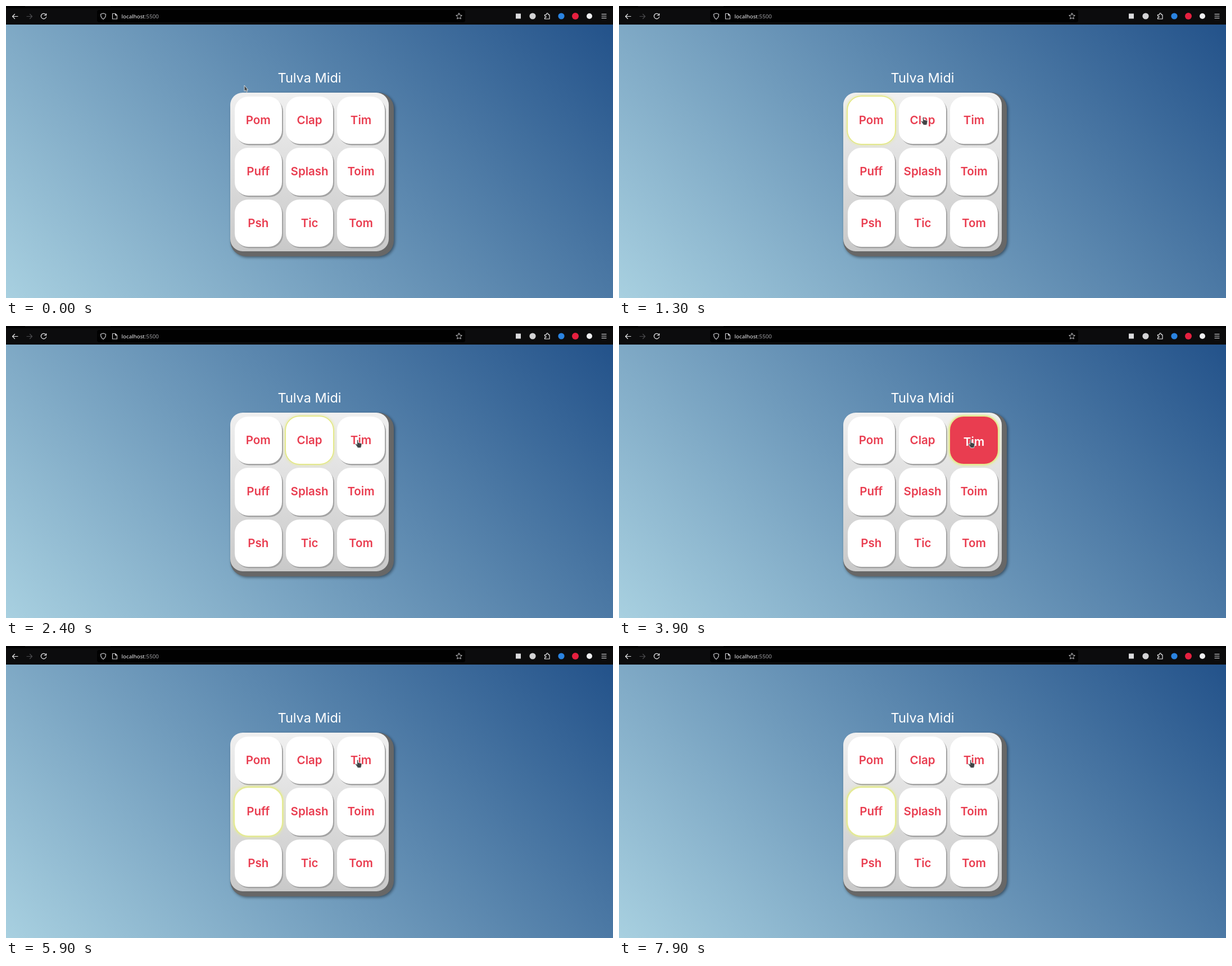
Recreate the animation shown at these times as an HTML page. Size 1080 px wide and 519 px high, loop 8000 ms.

```html
<!DOCTYPE html>
<html lang="pt">
<head>
<meta charset="utf-8">
<title>Tulva Midi</title>
<style>
  html, body { margin: 0; width: 100%; height: 100%; overflow: hidden; background: #0c0c0d; }
  #stage { position: relative; width: 1080px; height: 519px; overflow: hidden; }
  #stage > * { position: absolute; }
  #page { left: 0; top: 33px; width: 1080px; height: 486px; background: linear-gradient(45deg, #a8d0e0, #23528a); }
  #bar { left: 0; top: 0; }
  h1 { left: 0; top: 112px; width: 1080px; margin: 0; text-align: center; color: #fff;
       font: 400 23.5px/32px Inter, sans-serif; }
  #base { left: 399px; top: 154px; width: 291px; height: 291px; border-radius: 28px;
          background: #676767; box-shadow: 2px 2px 5px rgba(0, 0, 0, .45); }
  #board { left: 399px; top: 154px; width: 282px; height: 281.5px; border-radius: 22px;
           background: linear-gradient(#f0f0f0, #c9c9c9); }
  .key { width: 84.5px; height: 84.5px; border-radius: 24px; background: #fff; color: #e93d50;
         box-shadow: 2px 2.5px 0 #a3a3a3; text-align: center; font: 600 20.5px/84.5px Inter, sans-serif; }
  .key.focus { box-shadow: 0 0 0 1.5px #e3e87c, 0 0 5px 2px #e6eaa0; }
  .key.strong { box-shadow: 0 0 0 2.5px #e4ea94, 0 0 5px 3px #e4e9a4; }
  .key.down { background: #e93d50; color: #fff; line-height: 90.5px; }
  #pointer { left: 0; top: 0; overflow: visible; }
</style>
</head>
<body>
<div id="stage">
  <div id="page"></div>
  <svg id="bar" width="1080" height="33" fill="none" stroke="#e8e8ea" stroke-width="1.2" stroke-linecap="round" stroke-linejoin="round">
    <g stroke="none">
      <rect width="1080" height="33" fill="#0c0c0d"/>
      <rect width="1080" height="4" fill="#020202"/>
      <path d="M34 0h152v1H34z" fill="#1c1c1e"/>
      <rect x="162" y="7" width="655" height="22" rx="4" fill="#010101"/>
      <text x="205.5" y="22" font-family="Noto Sans, sans-serif" font-size="9.8" fill="#f4f4f6">localhost<tspan fill="#a2a2a6">:5500</tspan></text>
      <rect x="907" y="13.5" width="9" height="9" fill="#dcdcde"/>
      <circle cx="937" cy="18" r="5.6" fill="#d2d2d4"/>
      <circle cx="988" cy="18" r="5.6" fill="#2a83e0"/>
      <circle cx="1013" cy="18" r="6" fill="#e5203f"/>
      <circle cx="1038" cy="18" r="5" fill="#f0f0f2"/>
    </g>
    <path d="M21 18.500H11.500M15.500 14.500l-4 4 4 4"/>
    <path d="M37 18.500h9.500M42.500 14.500l4 4-4 4" stroke="#4b4b4e"/>
    <path d="M71 15.500A4.700 4.700 0 1 0 71.700 19M71.700 13.500v3h-3.500"/>
    <path d="M173 13l4.500 1.500c0 4.500-1 7-4.500 9-3.500-2-4.500-4.500-4.500-9z" stroke="#c9c9cc"/>
    <path d="M189.500 13.500h5l3 3v6.500h-8zM194.500 13.500v3h3" stroke="#c9c9cc"/>
    <path d="M806 12.800l1.600 3.400 3.700.5-2.700 2.600.7 3.700-3.300-1.800-3.300 1.800.7-3.700-2.700-2.600 3.700-.5z" stroke="#c9c9cc" stroke-width="1"/>
    <path d="M958.500 15.500h3v-1a1.600 1.600 0 0 1 3.200 0v1h2.300v7.500h-8.500v-2.200h1a1.500 1.500 0 0 0 0-3h-1z"/>
    <path d="M1060 14.500h8M1060 18h8M1060 21.500h8" stroke-width="1.100"/>
  </svg>
  <h1>Tulva Midi</h1>
  <div id="base"></div>
  <div id="board"></div>
  <svg id="pointer" width="1" height="1" fill="#414446" stroke="#e4e6e8" stroke-width=".9" stroke-linejoin="round">
    <path id="arrow" d="M0 0v10.500l2.200-1.900 1.700 3.400 1.700-.8-1.600-3.200h2.600z"/>
    <path id="hand" d="M-1.500-.5c0-1.500 2.200-1.500 2.200 0v3.700l5 1.200c1 .3 1.300 1 1.200 1.900l-.7 3.700-.9 2.500h-5.500l-1.600-2.600-2.500-3.300c-.5-1.300.6-1.700 1.500-1.100l1.300 1.100z"/>
  </svg>
</div>
<script>
const DURATION = 8000, STEP = 100;
const stage = document.getElementById('stage');
const pointer = document.getElementById('pointer');
const arrow = document.getElementById('arrow');
const hand = document.getElementById('hand');

const keys = ['Pom', 'Clap', 'Tim', 'Puff', 'Splash', 'Toim', 'Psh', 'Tic', 'Tom'].map((label, i) => {
  const el = document.createElement('div');
  const x = 406.5 + (i % 3) * 91.4, y = 160.5 + Math.floor(i / 3) * 91.5;
  el.className = 'key';
  el.textContent = label;
  el.style.left = x + 'px';
  el.style.top = y + 'px';
  stage.insertBefore(el, pointer);
  return { el, x, y };
});

// [time, x, y] of the pointer's hot spot
const path = [
  [0, 424, 141], [500, 449, 203], [900, 449, 203], [1300, 542, 199],
  [1800, 542, 199], [2200, 612, 203], [2300, 612, 203], [2400, 626, 204]
];
// [time, key] when a key takes the focus
const focuses = [[500, 0], [1500, 1], [3400, 2], [4800, 3]];
// [from, to, key] while a key is held down
const presses = [[500, 800, 0], [1500, 1700, 1], [3400, 4300, 2], [6100, 6400, 3], [7200, 7600, 3]];

function pointerAt(t) {
  const next = path.findIndex(p => p[0] > t);
  if (next < 0) return path[path.length - 1].slice(1);
  const [t0, x0, y0] = path[next - 1], [t1, x1, y1] = path[next];
  const u = (t - t0) / (t1 - t0), k = u * u * (3 - 2 * u);
  return [x0 + (x1 - x0) * k, y0 + (y1 - y0) * k];
}

function draw(now) {
  const t = Math.floor(now % DURATION / STEP) * STEP;
  const focused = focuses.filter(f => f[0] <= t).pop()?.[1];
  const [x, y] = pointerAt(t);
  keys.forEach(({ el }, i) => {
    const down = presses.some(p => p[2] === i && t >= p[0] && t < p[1]);
    el.classList.toggle('down', down);
    el.classList.toggle('focus', i === focused);
    el.classList.toggle('strong', i === focused && (down || i === 3));
  });
  const over = keys.some(k => x > k.x && x < k.x + 84.5 && y > k.y && y < k.y + 84.5);
  arrow.style.display = over ? 'none' : '';
  hand.style.display = over ? '' : 'none';
  pointer.style.transform = `translate(${x}px, ${y}px)`;
}

const start = performance.now();
function tick() {
  draw(performance.now() - start);
  requestAnimationFrame(tick);
}
tick();
</script>
</body>
</html>
```
